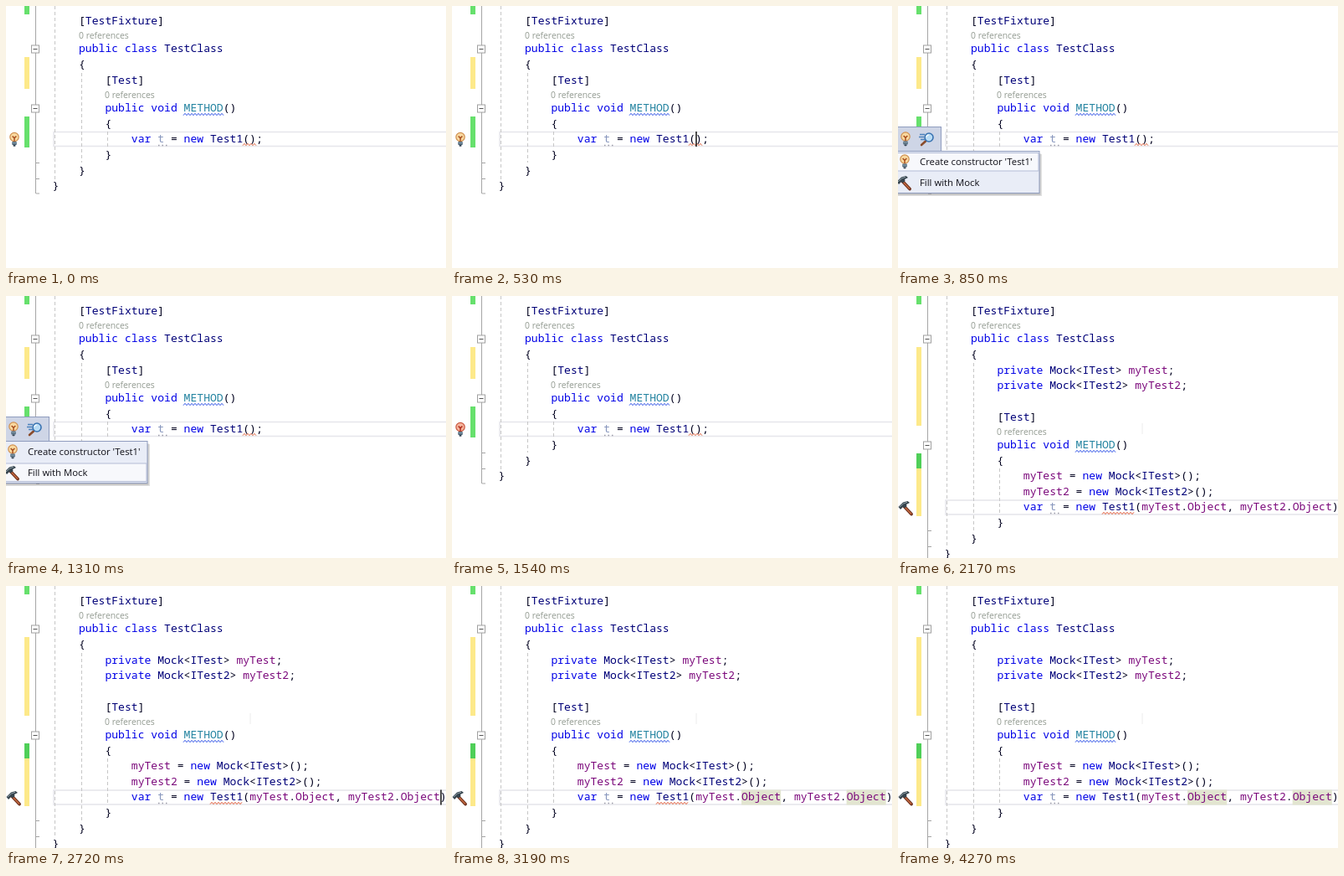
Recreate the animation shown at these times as an HTML page. Size 526x313 px, loop 4.59 s.

```html
<!DOCTYPE html>
<html lang="en">
<head>
<meta charset="utf-8">
<title>Code editor</title>
<style>
html, body { margin: 0; width: 100%; height: 100%; overflow: hidden; background: #fff; }
svg { display: block; width: 526px; height: 313px; }
text { white-space: pre; }
.code { font: 13.08px "Noto Sans Mono", monospace; fill: #00001e; }
.lens { font: 10.4px "Open Sans", sans-serif; fill: #929a90; }
.item { font: 11.35px "Open Sans", sans-serif; fill: #101018; }
.key { fill: #0000e6; }
.type { fill: #000078; }
.method { fill: #2383a0; }
.unused { fill: #8796bd; }
.field { animation: field 4590ms step-end infinite; }
@keyframes field { 0% { fill: #00001e; } 37.473%, 100% { fill: #7b087b; } }
</style>
</head>
<body>
<svg id="stage" viewBox="0 0 526 313"></svg>
<script>
const LOOP = 4590, CHAR = 7.85, LEFT = 55.6;
const stage = document.getElementById('stage');
const sheet = document.head.appendChild(document.createElement('style')).sheet;
let rules = 0;

function add(parent, tag, attrs = {}, text) {
  const node = document.createElementNS('http://www.w3.org/2000/svg', tag);
  for (const k in attrs) node.setAttribute(k, attrs[k]);
  if (text) node.textContent = text;
  return parent.appendChild(node);
}
const group = (parent, x = 0, y = 0) => add(parent, 'g', { transform: `translate(${x} ${y})` });
const rect = (p, x, y, width, height, fill, more) => add(p, 'rect', { x, y, width, height, fill, ...more });
const path = (p, d, stroke, width = 1, more) =>
  add(p, 'path', { d, fill: 'none', stroke, 'stroke-width': width, ...more });

// Shows a node only in the given [from, to] spans of the loop, in ms.
function during(node, ...spans) {
  const name = 'show' + rules++;
  const pct = ms => (ms / LOOP * 100).toFixed(3) + '%';
  let frames = spans[0][0] ? '0% { opacity: 0 } ' : '';
  for (const [from, to] of spans) {
    frames += `${pct(from)} { opacity: 1 } `;
    if (to < LOOP) frames += `${pct(to)} { opacity: 0 } `;
  }
  frames += `100% { opacity: ${spans.at(-1)[1] < LOOP ? 0 : 1} }`;
  sheet.insertRule(`@keyframes ${name} { ${frames} }`);
  node.style.animation = `${name} ${LOOP}ms step-end infinite`;
  return node;
}

const col = n => LEFT + n * CHAR;

function kind(word) {
  if (/^(public|private|class|void|var|new)$/.test(word)) return 'key';
  if (/^(myTest2?|Object)$/.test(word)) return 'field';
  if (word === 'METHOD') return 'method';
  if (word === 't') return 'unused';
  return /^[A-Z]/.test(word) ? 'type' : '';
}

function code(p, indent, y, source) {
  const line = add(p, 'text', { class: 'code', x: col(indent * 4), y });
  for (const part of source.match(/\w+|\W+/g)) add(line, 'tspan', { class: kind(part) }, part);
}

const lens = (p, x, y) => add(p, 'text', { class: 'lens', x, y }, '0 references');

function wave(p, x1, x2, y, color) {
  let d = `M${x1} ${y + 1.2}`;
  for (let x = x1 + 2, up = true; x <= x2; x += 2, up = !up) d += `L${x} ${y + (up ? -1.2 : 1.2)}`;
  return path(p, d, color, 1);
}

const guide = (p, x, y1, y2) =>
  path(p, `M${x} ${y1}V${y2}`, '#c6c6c6', 1, { 'stroke-dasharray': '4 3' });

const bar = (p, y1, y2, fill) => rect(p, 22, y1, 6, y2 - y1, fill);

function fold(p, y) {
  rect(p, 30.5, y - 4.5, 9, 9, '#fff', { stroke: '#a0a0a0' });
  path(p, `M32.5 ${y}H37.5`, '#555');
}

function currentLine(p, y) {
  rect(p, 57, y, 480, 17, 'none', { stroke: '#e7e7ec', 'stroke-width': 1.6 });
}

function caret(x, y, ...spans) {
  during(rect(stage, x, y, 1.4, 18, '#000'), ...spans);
}

function bulb(p, x, y, glass, edge, core) {
  const g = group(p, x, y);
  add(g, 'circle', { cy: -3, r: 5.2, fill: glass, stroke: edge, 'stroke-width': 1.2 });
  path(g, 'M-2.4 -4L0 -1.6L2.4 -4M0 -1.6V2', core, 1.5);
  rect(g, -2.8, 2.4, 5.6, 4, '#4d6578', { rx: 1 });
  path(g, 'M-2.5 4.2H2.5', '#a9bfca', 0.8);
  rect(g, -1.5, 6.4, 3, 1.8, '#354555', { rx: .7 });
}
const warmBulb = (p, x, y) => bulb(p, x, y, '#f9d9a0', '#cf8f4f', '#a84f20');

function hammer(p, x, y) {
  const g = group(p, x, y);
  path(g, 'M-2 -2L7 7.5', '#6c2f1c', 3.8, { 'stroke-linecap': 'round' });
  path(g, 'M-2 -2L6.6 7', '#c4693f', 1.7, { 'stroke-linecap': 'round' });
  add(g, 'path', { d: 'M-8.5 -1L-3 -6.5L2.5 -8L5 -6L1 -4L1.5 -2L-1 .5L-3 -1L-6 2Z', fill: '#35434c' });
  path(g, 'M-7 -1L-2.5 -5L2 -6.7', '#93a4ad', 1);
}

function search(p, x, y) {
  const g = group(p, x, y);
  path(g, 'M-8 -5H-2M-9 -2H-3M-7 1H-2', '#4c83bd', 1.3);
  path(g, 'M-1 3L-6 7.5', '#8a4c2b', 2.6, { 'stroke-linecap': 'round' });
  add(g, 'circle', { cx: 3, cy: -1.5, r: 5, fill: '#b9dcf5', stroke: '#3972b0', 'stroke-width': 1.6 });
  path(g, 'M0 -2A3 3 0 0 1 3 -4.5', '#fff', 1.1);
}

// Test method header; y is the baseline of its attribute.
function method(p, y) {
  code(p, 2, y, '[Test]');
  lens(p, 118, y + 17);
  code(p, 2, y + 33, 'public void METHOD()');
  wave(p, 212, 260, y + 36.5, '#3355e6');
  code(p, 2, y + 51.5, '{');
}

// Closing braces and outline ticks; y is the baseline of the first brace.
function closing(p, y) {
  [2, 1, 0].forEach((indent, i) => code(p, indent, y + i * 18.7, '}'));
  path(p, `M36 ${y + 5.5}H40M36 ${y + 24.5}H40M36 ${y + 42}H40`, '#a5a5a5');
  guide(p, 58.5, 0, y + 25);
  guide(p, 90.5, 80, y + 5);
}

function usage(p, y, args) {
  code(p, 3, y, `var t = new Test1(${args});`);
  path(p, `M182 ${y + 3.5}H193`, '#9a9aa8', 1.5, { 'stroke-dasharray': '1.5 3' });
}

function before() {
  const g = during(group(stage), [0, 1640]);
  bar(g, 61, 99, '#fde98a');
  bar(g, 132, 169, '#66e06c');
  path(g, 'M35.5 0V224', '#a5a5a5');
  fold(g, 122.5);
  currentLine(g, 150.5);
  guide(g, 121.5, 150, 169);
  method(g, 93);
  usage(g, 163, '');
  wave(g, 283, 299, 165.5, '#df6845');
  closing(g, 182);
  warmBulb(during(group(g), [0, 850]), 10, 159.5);
}

function after() {
  const g = during(group(stage), [1640, LOOP]);
  bar(g, 61, 155, '#fde98a');
  bar(g, 188, 206, '#4fcf58');
  bar(g, 206, 263, '#fde98a');
  path(g, 'M35.5 0V313', '#a5a5a5');
  fold(g, 178.5);
  path(g, 'M292 152V165', '#ececec');
  currentLine(g, 244);
  const marks = during(group(g), [3190, LOOP]);
  for (const n of [37, 53]) rect(marks, col(n), 243.5, 6 * CHAR, 18, '#e2e5d0');
  guide(g, 121.5, 206, 262);
  code(g, 2, 93, 'private Mock<ITest> myTest;');
  code(g, 2, 111, 'private Mock<ITest2> myTest2;');
  method(g, 149);
  code(g, 3, 219, 'myTest = new Mock<ITest>();');
  code(g, 3, 238, 'myTest2 = new Mock<ITest2>();');
  usage(g, 256, 'myTest.Object, myTest2.Object');
  during(wave(g, 244, 283, 259.5, '#df5a38'), [1640, 4270]);
  closing(g, 275);
  hammer(during(group(g), [2170, LOOP]), 9, 253);
}

function menu() {
  const g = during(group(stage), [850, 1540]);
  rect(g, -2, 177, 174, 50, '#000', { opacity: .12 });
  rect(g, -2, 176, 172.5, 50, '#000', { opacity: .12 });
  rect(g, -2, 144.5, 53.5, 31, '#ced5e6', { stroke: '#8f9cbe' });
  rect(g, -2, 173.5, 171, 50, '#e9edf7', { stroke: '#8f9cbe' });
  const hover = y => rect(g, -2, y, 170, 21.5, '#f7f8fc', { stroke: '#b3bcd6' });
  during(hover(175.5), [850, 1310]);
  during(hover(200), [1310, 1540]);
  warmBulb(g, 9, 159);
  search(g, 34, 158.5);
  warmBulb(g, 8, 186);
  hammer(g, 7, 211);
  add(g, 'text', { class: 'item', x: 26, y: 190 }, "Create constructor 'Test1'");
  add(g, 'text', { class: 'item', x: 26, y: 215 }, 'Fill with Mock');
}

bar(stage, 0, 10, '#66e06c');
before();
after();
fold(stage, 51.5);
code(stage, 1, 22, '[TestFixture]');
lens(stage, 87, 39);
code(stage, 1, 55, 'public class TestClass');
code(stage, 1, 74, '{');
bulb(during(group(stage), [1540, 2170]), 10, 159.5, '#f6b49c', '#c9573f', '#b02c1c');
menu();
caret(291.3, 150, [530, 850]);
caret(519.3, 243.5, [1640, 2170], [2720, 3190], [3720, 4270]);
</script>
</body>
</html>
```
